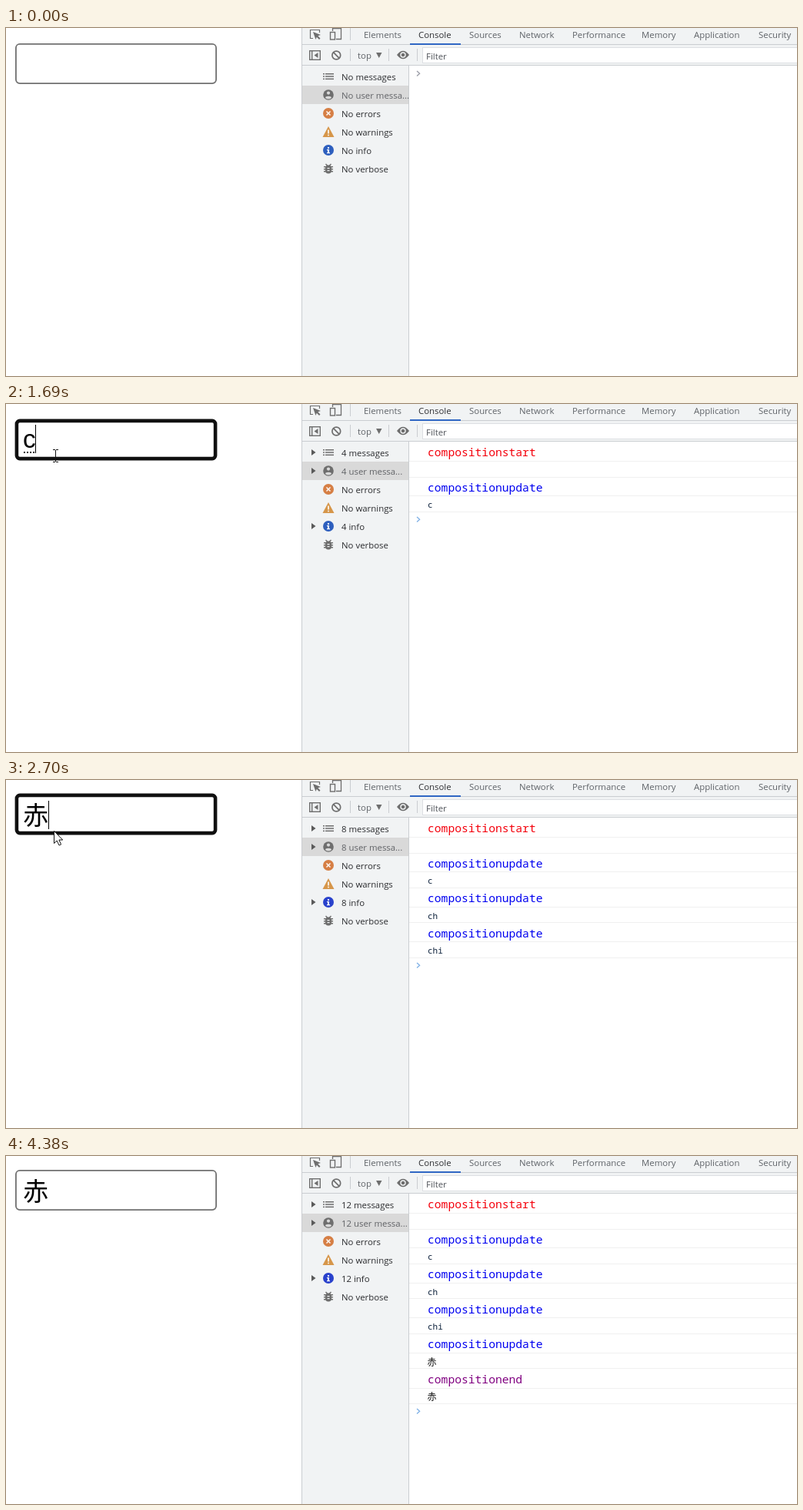
An HTML page with a canvas for the animation above (4510 ms loop, 1028x453 px).

```html
<!DOCTYPE html>
<html lang="en">
<head>
<meta charset="utf-8">
<title>Composition events</title>
<style>
html, body { margin: 0; width: 100%; height: 100%; overflow: hidden; background: #fff; }
canvas { display: block; width: 1028px; height: 453px; }
</style>
</head>
<body>
<canvas id="stage"></canvas>
<script>
const W = 1028, H = 453, LOOP = 4510;
const UI = '"Open Sans", "Noto Sans", sans-serif';
const MONO = '"Noto Sans Mono", "DejaVu Sans Mono", monospace';
const CJK = '"Noto Sans CJK SC", "Noto Sans CJK JP", "Noto Sans CJK", sans-serif';
const ARIAL = '"Liberation Sans", sans-serif';
const GREY = '#6e6e6e', LINE = '#cacdd1', PANEL = '#f1f3f4';

const canvas = document.getElementById('stage');
const ctx = canvas.getContext('2d');
const dpr = window.devicePixelRatio || 1;
canvas.width = W * dpr;
canvas.height = H * dpr;

function rect(x, y, w, h, color) {
  ctx.fillStyle = color;
  ctx.fillRect(x, y, w, h);
}

function text(str, x, y, size, font, color) {
  ctx.font = size + 'px ' + font;
  ctx.fillStyle = color;
  ctx.fillText(str, x, y);
}

function label(str, x, y, color) {
  text(str, x, y, 11.4, UI, color);
}

function trace(points, close) {
  ctx.beginPath();
  for (let i = 0; i < points.length; i += 2) ctx.lineTo(points[i], points[i + 1]);
  if (close) ctx.closePath();
}

function line(points, color, width) {
  trace(points);
  ctx.strokeStyle = color;
  ctx.lineWidth = width;
  ctx.stroke();
}

function poly(points, color) {
  trace(points, true);
  ctx.fillStyle = color;
  ctx.fill();
}

function disc(x, y, r, color) {
  ctx.beginPath();
  ctx.arc(x, y, r, 0, Math.PI * 2);
  ctx.fillStyle = color;
  ctx.fill();
}

function ring(x, y, r, color, width) {
  ctx.beginPath();
  ctx.arc(x, y, r, 0, Math.PI * 2);
  ctx.strokeStyle = color;
  ctx.lineWidth = width;
  ctx.stroke();
}

function frame(x, y, w, h, color, width) {
  ctx.strokeStyle = color;
  ctx.lineWidth = width;
  ctx.strokeRect(x, y, w, h);
}

// Latest value of a [time, value] list at time t
function at(list, t) {
  let value = list[0][1];
  for (const [time, v] of list) if (t >= time) value = v;
  return value;
}

const typed = [[0, ''], [1690, 'c'], [1820, 'ch'], [1950, 'chi'], [2700, '赤']];
const groupCount = [[0, 0], [1690, 2], [1820, 3], [1950, 4], [2760, 6]];
const candidates = [[0, ''], [1760, '才从次曾此草层'], [1890, '吃出×÷陈成车'],
  [2020, '赤持尺吃池迟齿'], [2700, '']];
const caretOn = [[0, false], [700, true], [1230, false], [1690, true], [2480, false],
  [2700, true], [3240, false], [3770, true], [4310, false]];
const focused = [[0, false], [700, true], [4380, false]];

const logs = [
  ['compositionstart', '#f4000c', ''],
  ['compositionupdate', '#0000f0', 'c'],
  ['compositionupdate', '#0000f0', 'ch'],
  ['compositionupdate', '#0000f0', 'chi'],
  ['compositionupdate', '#0000f0', '赤'],
  ['compositionend', '#800080', '赤']
];

const tabs = [['Elements', 465], ['Console', 536], ['Sources', 602], ['Network', 667],
  ['Performance', 736], ['Memory', 826], ['Application', 894], ['Security', 978]];

function mix(a, b, u) {
  return [a[0] + (b[0] - a[0]) * u, a[1] + (b[1] - a[1]) * u];
}

// Pointer position, or null while it is off the stage
function pointer(t) {
  const rest = [64, 67], tip = [62, 66], stop = [839, 270];
  if (t < 70 || t >= 4180) return null;
  if (t < 630) {
    const u = Math.floor((t - 70) / 70) / 7;
    return mix([584, 355], [66, 64], u * u * (3 - 2 * u));
  }
  if (t < 770) return [65, 69];
  if (t < 1760) return rest;
  if (t < 3370) return tip;
  if (t < 3770) {
    const u = Math.min(1, (Math.floor((t - 3370) / 68) + 1) / 6);
    return mix(tip, stop, u * u * (3 - 2 * u));
  }
  const u = Math.min(1, (Math.floor((t - 3770) / 68) + 1) / 6);
  return mix(stop, [1007, 446], u);
}

function drawPointer(p, beam) {
  ctx.save();
  ctx.translate(Math.round(p[0]), Math.round(p[1]));
  if (beam) {
    rect(0, -7, 1, 15, '#111');
    for (const y of [-8, 8]) {
      rect(-3, y, 3, 1, '#111');
      rect(1, y, 3, 1, '#111');
    }
    rect(-2, 4, 5, 1, '#111');
  } else {
    const arrow = [0.5, 0.5, 0.5, 16.5, 4.2, 13, 7, 19, 9.6, 17.9, 6.9, 12, 11.7, 12];
    poly(arrow, '#fff');
    trace(arrow, true);
    ctx.strokeStyle = '#111';
    ctx.lineWidth = 1;
    ctx.stroke();
  }
  ctx.restore();
}

function drawField(t, beam) {
  const str = at(typed, t), chosen = str === '赤', on = at(focused, t);
  const top = chosen ? 18 : 20;
  const w = on ? 4.6 : 1.8, grow = on ? 0.4 : 0;
  ctx.beginPath();
  ctx.roundRect(12 - grow + w / 2, top - grow + w / 2, 262 + 2 * grow - w, 53 + 2 * grow - w, on ? 4 : 5);
  ctx.strokeStyle = on ? '#101010' : beam ? '#4f4f4f' : '#707070';
  ctx.lineWidth = w;
  ctx.stroke();
  text(str, 22, chosen ? 58 : 57, 33.33, chosen ? CJK : ARIAL, '#000');
  const end = Math.floor(22 + (str ? ctx.measureText(str).width : 0));
  if (str && !chosen) {
    for (let x = 23; x < end; x += 4) rect(x, 62, 2, 2, '#111');
  }
  if (at(caretOn, t)) rect(end, str ? 27 : 28, 1, 37, '#000');
}

function drawToolbar() {
  rect(384, 0, 1, H, LINE);
  rect(385, 0, W - 385, 48, PANEL);
  rect(385, 21, W - 385, 1, LINE);
  rect(385, 48, W - 385, 1, LINE);
  rect(525, 20, 66, 2, '#2f66c4');
  for (const [name, x] of tabs) label(name, x, 13, name === 'Console' ? '#303134' : '#5f6368');

  // Inspect and device icons
  line([399, 13.5, 395.5, 13.5, 395.5, 2.5, 407.5, 2.5, 407.5, 6], GREY, 1.2);
  poly([399, 5, 409, 9, 405.3, 10.3, 408.5, 13.6, 407, 15, 403.8, 11.8, 402.5, 15], GREY);
  line([424.5, 4, 424.5, 0.7, 435.5, 0.7, 435.5, 14.5, 429, 14.5], GREY, 1.3);
  frame(421.5, 5.5, 6, 9.5, GREY, 1.4);
  rect(447, 0, 1, 16, LINE);

  frame(394.7, 29.7, 13.6, 11.6, GREY, 1.4);
  rect(397, 30, 1.4, 11, GREY);
  poly([405.5, 32, 405.5, 39, 400.5, 35.5], GREY);
  ring(429.3, 35.5, 5.4, GREY, 1.7);
  line([425.5, 31.7, 433.1, 39.3], GREY, 1.7);
  for (const x of [447, 497, 534]) rect(x, 27, 1, 16, LINE);
  label('top', 457, 40, '#5f6368');
  poly([481, 32, 488.5, 32, 484.75, 39], GREY);

  ctx.beginPath();
  ctx.moveTo(508, 35);
  ctx.quadraticCurveTo(516, 24.5, 524, 35);
  ctx.quadraticCurveTo(516, 45.5, 508, 35);
  ctx.fillStyle = GREY;
  ctx.fill();
  disc(516, 35, 3.7, PANEL);
  disc(516, 35, 2.3, GREY);

  rect(541, 25, W - 541, 21, '#dcdfe2');
  rect(542, 26, W - 542, 19, '#fff');
  label('Filter', 546, 41, '#50545a');
}

function drawSidebar(n) {
  const count = n || 'No';
  rect(385, 49, 138, H - 49, PANEL);
  rect(385, 75, 138, 24, '#d9d9d9');
  rect(523, 49, 1, H - 49, LINE);
  const rows = [count + ' messages', count + ' user messa...', 'No errors',
    'No warnings', count + ' info', 'No verbose'];
  rows.forEach((row, i) => {
    const y = 63 + i * 24;
    label(row, 436, y + 5, i === 1 ? '#606266' : '#2a2b2e');
    if (row[0] !== 'N') poly([397, y - 4, 402.5, y, 397, y + 4], '#5a5a5a');
  });

  for (const y of [59, 62.3, 65.6]) {
    rect(412, y, 2, 1.5, GREY);
    rect(415, y, 11, 1.5, GREY);
  }
  disc(419, 87, 6.8, GREY);
  disc(419, 84.6, 2.1, '#d9d9d9');
  ctx.beginPath();
  ctx.ellipse(419, 91, 4, 2.2, 0, Math.PI, 0);
  ctx.quadraticCurveTo(419, 94, 415, 91);
  ctx.fillStyle = '#d9d9d9';
  ctx.fill();

  disc(419, 111, 7, '#d67f45');
  line([416.5, 108.5, 421.5, 113.5], '#fff', 1.4);
  line([421.5, 108.5, 416.5, 113.5], '#fff', 1.4);

  poly([419, 128, 426.5, 142, 411.5, 142], '#d6964a');
  rect(418.2, 132.5, 1.6, 5, '#fff');
  rect(418.2, 138.7, 1.6, 1.6, '#fff');

  disc(419, 159, 7, n >= 8 ? '#2a42cc' : '#2e5fbe');
  rect(418, 155, 2, 2, '#fff');
  rect(417, 158, 3, 1.2, '#fff');
  rect(418, 158, 2, 5, '#fff');
  rect(417, 162, 4, 1.2, '#fff');

  for (const y of [180, 183, 186]) rect(413, y, 12, 1.5, GREY);
  line([415.5, 177, 418, 179.5], GREY, 1.4);
  line([422.5, 177, 420, 179.5], GREY, 1.4);
  ctx.beginPath();
  ctx.roundRect(415, 178.5, 8, 11, 4);
  ctx.fillStyle = GREY;
  ctx.fill();
  rect(417.5, 182, 3, 1.2, PANEL);
  rect(417.5, 185, 3, 1.2, PANEL);
}

function drawConsole(groups) {
  for (let g = 0; g < groups; g++) {
    const [name, color, value] = logs[g];
    text(name, 548, Math.round(68 + 45.6 * g), 14.67, MONO, color);
    rect(524, Math.floor(74 + 45.6 * g), W - 524, 1, '#f0f0f0');
    const y = Math.round(89.6 + 45.5 * g);
    if (value === '赤') text(value, 547.5, y + 1, 12, CJK, '#111');
    else text(value, 548, y, 11, MONO, '#10243e');
    rect(524, Math.floor(95 + 45.4 * g), W - 524, 1, '#f0f0f0');
  }
  const y = Math.floor(59 + 45.5 * groups) + 0.3;
  line([534, y - 3.3, 537.6, y, 534, y + 3.3], groups ? '#7fb0e6' : '#9a9ca6', 1.3);
}

function drawPopup(chars) {
  if (!chars) return;
  const right = chars.includes('×') ? 557 : 604;
  rect(22, 64, right - 22, 46, '#c9c9c9');
  const shade = ctx.createLinearGradient(23, 0, right, 0);
  shade.addColorStop(0, '#e9e9e9');
  shade.addColorStop(1, '#f2f2f2');
  rect(23, 65, right - 24, 43, shade);
  rect(23, 65, 61, 43, '#71a3d8');

  let x = 35;
  [...chars].forEach((ch, i) => {
    const sign = ch === '×' || ch === '÷';
    text(String(i + 1), x, 93.5, 19, UI, i ? '#686868' : '#4c5c70');
    text(ch, x + (sign ? 20 : 18.5), 94, 19, sign ? UI : CJK, '#111');
    x += sign ? 57 : 61;
  });

  rect(right - 115, 65, 1, 43, '#d2d2d2');
  rect(right - 50, 65, 1, 43, '#d2d2d2');
  line([right - 97, 81, right - 103, 87, right - 97, 93], '#a8a8a8', 1.3);
  line([right - 67, 81, right - 61, 87, right - 67, 93], '#222', 1.5);
  const fx = right - 25;
  ring(fx, 87, 7.5, '#222', 1.4);
  disc(fx - 2.7, 85, 1.1, '#222');
  disc(fx + 2.7, 85, 1.1, '#222');
  ctx.beginPath();
  ctx.arc(fx, 87.2, 4, 0.3, Math.PI - 0.3);
  ctx.stroke();
}

function draw(t) {
  const p = pointer(t), groups = at(groupCount, t);
  const beam = !!p && t < 1760 && p[0] < 274 && p[1] < 73;
  ctx.setTransform(dpr, 0, 0, dpr, 0, 0);
  rect(0, 0, W, H, '#fff');
  drawField(t, beam);
  drawToolbar();
  drawSidebar(groups * 2);
  drawConsole(groups);
  drawPopup(at(candidates, t));
  if (p) drawPointer(p, beam);
}

const start = performance.now();
function tick() {
  draw((performance.now() - start) % LOOP);
  requestAnimationFrame(tick);
}
tick();
</script>
</body>
</html>
```
